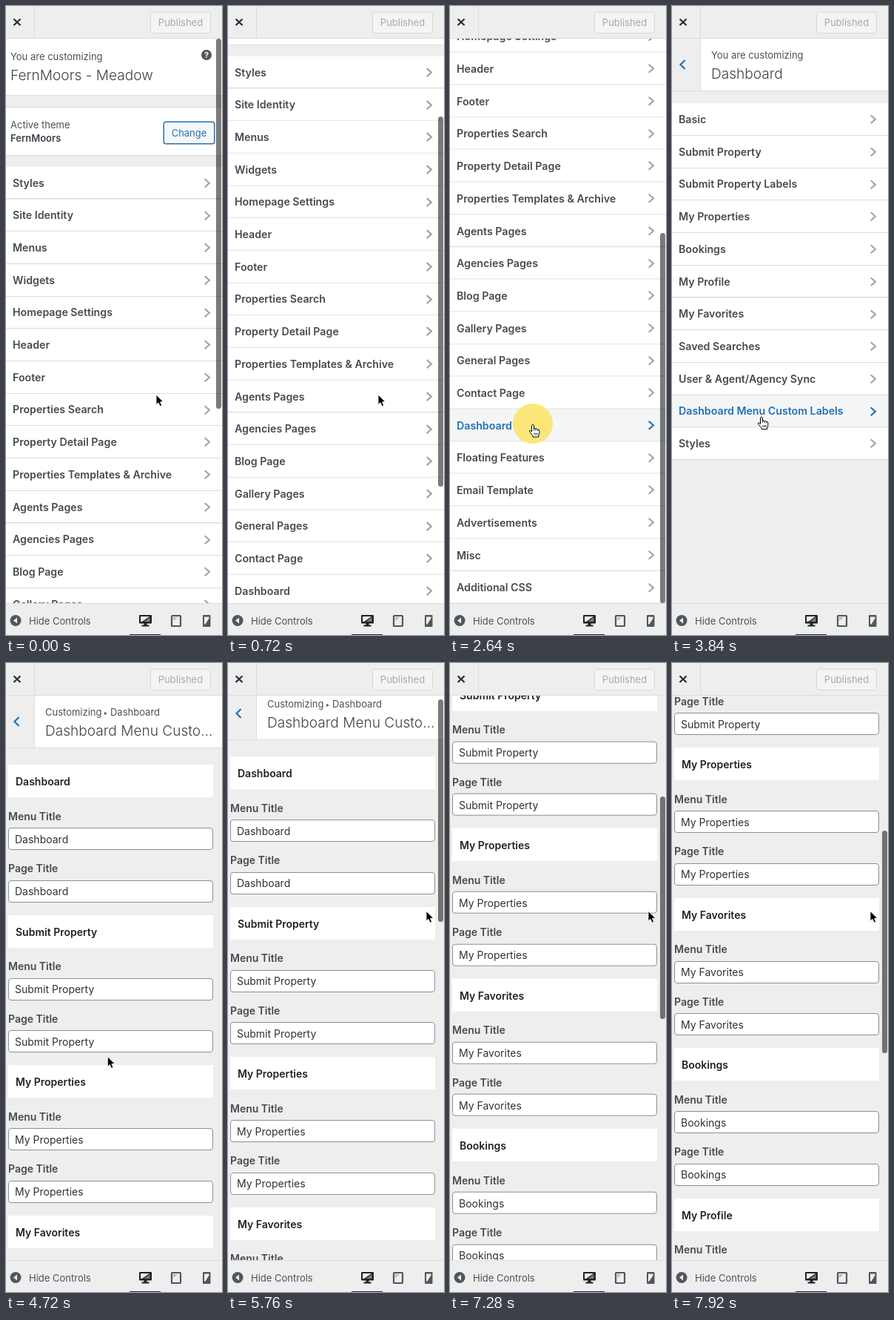
Animation of 292x848 px, one loop 8 s. Source, as an HTML page:

```html
<!DOCTYPE html>
<html lang="en">
<head>
<meta charset="utf-8">
<title>Customizer menu</title>
<style>
  html, body { margin: 0; width: 100%; height: 100%; overflow: hidden; background: #eee; }
  #stage { position: relative; width: 292px; height: 848px; overflow: hidden; background: #eee;
    font: 13px/20px Inter, "Open Sans", sans-serif; color: #4b5158; -webkit-font-smoothing: antialiased; }
  #stage div { position: absolute; box-sizing: border-box; white-space: nowrap; }
  #stage svg { position: absolute; left: 0; top: 0; overflow: visible; }
  #view { left: 0; top: 44px; width: 292px; height: 761px; overflow: hidden; }
  .panel { left: 0; top: -44px; width: 292px; height: 848px; }
  .body { left: 0; top: 0; width: 292px; }
  .block { left: 0; width: 292px; background: #fff; }
  .edge { border: solid #dcdcde; border-width: 1px 0; }
  .row { left: 0; width: 292px; height: 43.7px; background: #fff; border-bottom: 1px solid #dcdcde; }
  .bold { font-weight: 600; font-size: 14px; color: #464a50; }
  .row .bold { font-size: 14.2px; }
  .title { font-weight: 300; font-size: 19.1px; color: #3c434a; }
  .dark { color: #1d2327; }
  .back { left: 0; top: 44px; width: 39px; height: 70px; background: #eee; border-right: 1px solid #dcdcde; }
  .row path { stroke: #a1a5a9; }
  .hover { background: #f4f5f5; }
  .hover .bold { color: #2271b1; }
  .hover path { stroke: #2271b1; }
  .heading { left: 3px; width: 277px; height: 44px; background: #fff; }
  .input { left: 3px; width: 277px; height: 30px; background: #fff; border: 1px solid #8c8f94; border-radius: 4px; }
  .value { font-size: 14px; color: #2c3338; }
  .button { border: 1px solid; border-radius: 3px; text-align: center; }
  .thumb { left: 284px; width: 6.5px; border-radius: 3.5px; background: rgba(0, 0, 0, .52); }
  .tri { display: inline-block; margin: 0 4px 1px 3.5px; border: solid transparent; border-width: 2.7px 0 2.7px 4.5px; border-left-color: #50575e; }
  #click { width: 54px; height: 54px; margin: -27px; border-radius: 50%; background: #fbe779; }
</style>
</head>
<body>
<div id="stage">
  <div id="view">
    <div class="panel" id="root"><div class="body"></div><div class="thumb"></div></div>
    <div class="panel" id="menu"><div class="body"></div></div>
    <div class="panel" id="labels"><div class="body"></div><div class="thumb"></div></div>
  </div>
  <div style="left:0;top:0;width:292px;height:44px;background:#eee;border-bottom:1px solid #dcdcde"></div>
  <div style="left:38px;top:0;width:1px;height:43px;background:#dcdcde"></div>
  <div class="button" style="left:195px;top:8px;width:82px;height:29px;line-height:27px;color:#a7aaad;background:#f4f4f5;border-color:#d8d8da">Published</div>
  <div style="left:0;top:805px;width:292px;height:43px;background:#eee;border-top:1px solid #dcdcde"></div>
  <div style="left:31px;top:819px">Hide Controls</div>
  <div style="left:167px;top:847px;width:42px;height:1px;background:#1d2327"></div>
  <svg width="292" height="848" fill="none">
    <path d="M10.5 17.5l9 8.5m0-8.5l-9 8.5" stroke="#2c3338" stroke-width="2.4"/>
    <circle cx="13" cy="828.5" r="7.5" fill="#50575e"/>
    <path d="M15 824.5v8l-5-4z" fill="#eee"/>
    <g fill="#1d2327">
      <rect x="180" y="821" width="17" height="11.5" rx="1"/>
      <path d="M186.500 832h4v2.500h3v2h-10v-2h3z"/>
    </g>
    <path d="M182 823h12l-10 7h-2z" fill="#eee"/>
    <path d="M194.500 824v6h-8z" fill="#777c81"/>
    <rect x="224" y="822" width="12" height="14" rx=".8" stroke="#50575e" stroke-width="2.2"/>
    <path d="M226 829v-5h6z" fill="#b8bbbe"/>
    <rect x="266" y="821" width="10.500" height="16" rx="1.200" fill="#50575e"/>
    <path d="M268 823.500h6.500v2l-5 8h-1.500z" fill="#eee"/>
  </svg>
  <div id="click"></div>
  <svg id="cursor" width="20" height="20">
    <path id="arrow" d="M0 0V13.500L3 10.800 5.200 15.700 7.700 14.600 5.500 9.900 9.600 9.500Z" fill="#000" stroke="#fff" stroke-width=".9"/>
    <g id="hand" stroke="#000" stroke-linejoin="round">
      <path d="M-1.500 1.500Q0-1 1.500 1.500V6Q3 4.800 4 6.300 5.500 5.300 6.500 7 8.600 6.300 8.800 8.500V11Q8.800 13 7.800 14.500V17H0V15.500L-4.500 9.800Q-4.800 7.600-2.800 8.600L-1.500 10Z" fill="#fff"/>
      <path d="M1.500 6v2.500M4 6.300v2.500M6.500 7v2M2 11.500v3M4 11.500v3M6 11.500v3" stroke-width=".8"/>
    </g>
  </svg>
</div>
<script>
const $ = (query) => document.querySelector(query);
const ROW = 43.7;

const div = (cls, css, html = '') => `<div class="${cls}" style="${css}">${html}</div>`;
const text = (x, mid, html, cls = '') => div(cls, `left:${x}px;top:${mid - 10}px`, html);
const block = (top, height, cls = 'block edge') => div(cls, `top:${top}px;height:${height}px`);
const chevron = `<svg width="292" height="43"><path d="M268.700 16.300l6.200 5.500-6.200 5.500" fill="none" stroke-width="2.200"/></svg>`;

const rows = (top, names) => names.map((name, i) =>
  div('row', `top:${top + i * ROW}px`, text(9, 21.8, name, 'bold') + chevron)).join('');

const panelHead = (crumb, title) => block(43, 72) + div('back', '')
  + `<svg width="38" height="115"><path d="M17.500 73l-6 6 6 6" fill="none" stroke="#2271b1" stroke-width="2.200"/></svg>`
  + text(53, 66, crumb) + text(53, 91, title, 'title');

const field = (mid, label, value) => text(3, mid, label, 'bold')
  + div('input', `top:${mid + 15.5}px`) + text(12, mid + 31, value, 'value');

const group = (name, i) => {
  const top = 137 + i * 202.5;
  return block(top, 44, 'heading') + text(13, top + 23, name, 'bold dark')
    + field(top + 69.5, 'Menu Title', name) + field(top + 140, 'Page Title', name);
};

$('#root .body').innerHTML = block(43, 78) + text(6, 68, 'You are customizing')
  + text(6, 93, 'FernMoors - Meadow', 'title')
  + div('', 'left:264px;top:59px;width:14px;height:14px;border-radius:50%;background:#50575e;color:#fff;font:700 11px/14px Inter,sans-serif;text-align:center', '?')
  + block(136, 66) + text(6, 160, 'Active theme')
  + text(6, 177.5, '<b style="font-weight:600;color:#3c434a">FernMoors</b>')
  + div('button', 'left:213px;top:156px;width:69px;height:30px;line-height:28px;color:#2271b1;background:#f6f7f7;box-shadow:0 0 0 .5px #2271b1', 'Change')
  + rows(216.8, ['Styles', 'Site Identity', 'Menus', 'Widgets', 'Homepage Settings', 'Header', 'Footer',
    'Properties Search', 'Property Detail Page', 'Properties Templates &amp; Archive', 'Agents Pages',
    'Agencies Pages', 'Blog Page', 'Gallery Pages', 'General Pages', 'Contact Page', 'Dashboard',
    'Floating Features', 'Email Template', 'Advertisements', 'Misc', 'Additional CSS']);

$('#menu .body').innerHTML = panelHead('You are customizing', 'Dashboard')
  + div('', 'left:0;top:130.5px;width:292px;height:1px;background:#dcdcde')
  + rows(131.3, ['Basic', 'Submit Property', 'Submit Property Labels', 'My Properties', 'Bookings', 'My Profile',
    'My Favorites', 'Saved Searches', 'User &amp; Agent/Agency Sync', 'Dashboard Menu Custom Labels', 'Styles']);

$('#labels .body').innerHTML = panelHead('Customizing<span class="tri"></span>Dashboard', 'Dashboard Menu Custo…')
  + ['Dashboard', 'Submit Property', 'My Properties', 'My Favorites', 'Bookings', 'My Profile', 'Saved Searches']
    .map(group).join('');

// Tracks are [time, value] pairs; a third item eases the stretch that ends there.
const smooth = (p) => p * p * (3 - 2 * p);
const out = (p) => 1 - (1 - p) ** 3;
const at = (t, track) => {
  const i = track.findIndex(([time]) => time > t);
  if (i === 0) return track[0][1];
  if (i < 0) return track[track.length - 1][1];
  const [t0, v0] = track[i - 1], [t1, v1, ease] = track[i];
  const p = (t - t0) / (t1 - t0);
  return v0 + (v1 - v0) * (ease ? ease(p) : p);
};

const MAX_SCROLL = 372.5;
const rootScroll = [[0, 0], [319, 0], [320, 2], [480, 2], [1040, 376, smooth], [1200, 374], [2000, MAX_SCROLL, out]];
const labelScroll = [[5680, 0], [5760, 11], [6560, 197], [7920, 428]];
const slide = [[2640, 0], [2860, 1, smooth], [4400, 1], [4620, 2, smooth]];
const cursorX = [[2080, 203], [2480, 112, smooth], [3200, 112], [3840, 121, smooth],
  [4640, 121], [5040, 278, smooth], [5120, 278], [5360, 268, smooth]];
const cursorY = [[2080, 524], [2480, 564, smooth], [3200, 564], [3840, 553.5, smooth],
  [4640, 553.5], [5040, 334.5, smooth]];
const clickFade = [[2639, 0], [2640, 1], [2880, 0], [4399, 0], [4400, 1], [4640, 0]];

const panels = ['root', 'menu', 'labels'].map((id) => $('#' + id));
const rootRows = [...document.querySelectorAll('#root .row')];
const menuRows = [...document.querySelectorAll('#menu .row')];
const rootThumb = $('#root .thumb'), labelThumb = $('#labels .thumb');

function hover(list, top, y, on) {
  const index = on ? Math.floor((y - top) / ROW) : -1;
  list.forEach((row, i) => row.classList.toggle('hover', i === index));
}

function draw(t) {
  const x = at(t, cursorX), y = at(t, cursorY);
  const scroll = at(t, rootScroll), lower = at(t, labelScroll), page = at(t, slide);

  panels.forEach((panel, i) => {
    panel.style.transform = `translateX(${Math.max(-1, Math.min(1, i - page)) * 292}px)`;
  });
  $('#root .body').style.transform = `translateY(${-scroll}px)`;
  $('#labels .body').style.transform = `translateY(${-lower}px)`;

  const over = Math.max(0, scroll - MAX_SCROLL) * 1.3;
  rootThumb.style.top = 44 + Math.min(scroll, MAX_SCROLL) * 0.703 + over + 'px';
  rootThumb.style.height = 499 - over + 'px';
  labelThumb.style.top = 44.3 + lower * 0.425 + 'px';
  labelThumb.style.height = '300px';
  labelThumb.style.opacity = t >= 5760 ? 1 : 0;

  hover(rootRows, 216.8 - scroll, y, t >= 2160 && t < 2880);
  hover(menuRows, 131.3, y, t >= 3280 && t < 4640);

  const pointing = t >= 2160 && t < 4640;
  $('#hand').style.display = pointing ? '' : 'none';
  $('#arrow').style.display = pointing ? 'none' : '';
  $('#cursor').style.transform = `translate(${x}px,${y}px)`;
  $('#click').style.transform = `translate(${x}px,${y - 1}px)`;
  $('#click').style.opacity = at(t, clickFade);
}

const STEP = 80, LOOP = 8000;
const start = performance.now();
function tick() {
  const elapsed = performance.now() - start;
  draw(Math.floor(elapsed / STEP) * STEP % LOOP);
  requestAnimationFrame(tick);
}
tick();
</script>
</body>
</html>
```
